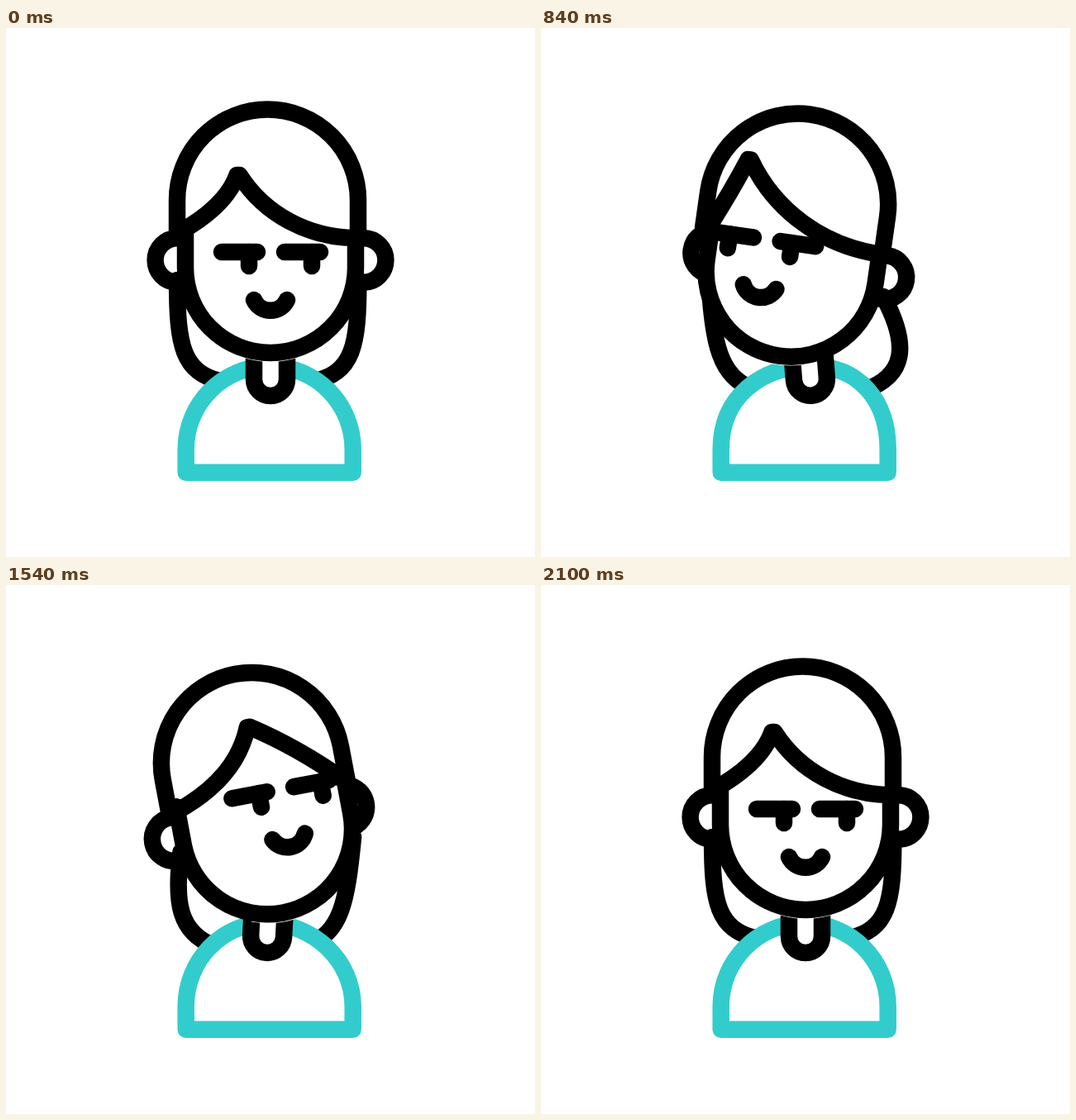
An HTML page that plays this animation: 640 by 640 pixels, repeating every 2400 ms.

```html
<!DOCTYPE html>
<html lang="en">
<head>
<meta charset="utf-8">
<title>Head turn</title>
<style>
  html, body { margin: 0; width: 100%; height: 100%; overflow: hidden; background: #fff; }
  svg { display: block; width: 100%; height: 100%; }
  path { fill: none; stroke: #000; stroke-width: 20.5; stroke-linecap: round; stroke-linejoin: round; }
  .solid { fill: #fff; }
  #shirt { stroke: #3cc; }
  #gap { stroke: #fff; stroke-width: 21.5; stroke-linecap: butt; }
</style>
</head>
<body>
<svg viewBox="0 0 640 640">
  <path id="backHair"/>
  <path id="shirt" class="solid"/>
  <path id="neck" class="solid" d="M300 385V425A20 20 0 0 0 340 425V385"/>
  <g id="head">
    <path id="gap" d="M-36 96.5A103 103 0 0 0 36 96.5"/>
    <path id="leftEar" d="M-112.7 -35.7A26.7 26.7 0 0 0 -112.7 17.7"/>
    <path id="rightEar" d="M112.7 -35.7A26.7 26.7 0 0 1 112.7 17.7"/>
    <path class="solid" d="M-103 -47V0A103 103 0 0 0 103 0V-36"/>
    <path d="M-113 -38V-82A109.5 109.5 0 0 1 106 -82V-38"/>
    <path id="fringe"/>
    <g id="features">
      <path d="M-59 -19H-16M17 -19H60M-20 39A22 22 0 0 0 20 39"/>
      <path id="pupils" d="M-26 -19V-2M50 -19V-2"/>
    </g>
  </g>
</svg>
<script>
const LOOP = 2400, STEP = 20, LEFT = 840, RIGHT = 1470, END = 2100;
const $ = id => document.getElementById(id);
const setPath = (id, d) => $(id).setAttribute('d', d);
const move = (id, x, y = 0) => $(id).setAttribute('transform', `translate(${x} ${y})`);

// Rises from 0 to 1 at the peak and falls back to 0.
const ramp = (t, from, peak, to) =>
  Math.max(0, Math.min((t - from) / (peak - from), (to - t) / (to - peak)));

// One lock of hair behind the head; side is -1 or 1.
function strand(side, root, belly, tip, rise, drop) {
  const edge = 316.7 + side * 109.6;
  return `M${edge + root} ${305 + rise}C${edge + belly} 385 ` +
    `${edge - side * 6 + belly} ${417 + drop / 3} ${edge - side * 55 + tip} ${428 + drop}`;
}

function drawFringe(tilt, left, right) {
  const shift = -3.7 * tilt, sag = 1 + 0.2 * left - 1.35 * right;
  const x = -39 + shift, y = -112 - 15 * (left + right);
  const endY = -36 - 5 * right, dx = 103 - x, dy = endY - y;
  const bend = shift * (shift < 0 ? 1.1 : 0.7);
  setPath('fringe',
    `M-103 ${-47 + 6 * right}Q${-53 + bend} ${-77 + shift / 4} ${x - 1.5} ${y}H${x + 1.5}` +
    `C${x + dx / 3 - 15 * sag} ${y + dy / 3 + 23 * sag} ` +
    `${x + dx * 2 / 3 - 9 * sag} ${y + dy * 2 / 3 + 25 * sag} 103 ${endY}`);
}

function drawBody(tilt, left, right) {
  const drop = 10 * (left + right), lean = 9 * left - 4 * right;
  setPath('backHair',
    strand(-1, 5 * right - 4 * left, 2 * left - 4 * right, -4 * left - 12 * right, 20 * right, drop) +
    strand(1, -12 * left - 7 * right, 20 * left - 16 * right, 21 * left - 9 * right, 20 * left, drop));
  setPath('shirt',
    `M217.7 537.8V510C217.7 ${454 - 9 * left} ${263 + lean / 2} 409 ${318.7 + lean} 409` +
    `C${375 + lean} 409 419.7 ${454 - 4 * left} 419.7 510V537.8Z`);
  const sway = tilt * (tilt > 0 ? -0.56 : -0.28);
  $('neck').setAttribute('transform', `rotate(${sway} 320 350)`);
}

function draw(t) {
  const left = ramp(t, 0, LEFT, RIGHT), right = ramp(t, LEFT, RIGHT, END);
  const tilt = 8.1 * left - 12 * right;
  const x = 320 - 17.4 * left - 4.5 * right, y = 290 + 4.7 * left + 6 * right;
  $('head').setAttribute('transform', `translate(${x} ${y}) rotate(${tilt})`);
  move('features', 27 * right - 35 * left, -15.4 * left - 28.5 * right);
  move('pupils', -19 * left);
  move('leftEar', 16 * left);
  move('rightEar', -18 * right);
  drawFringe(tilt, left, right);
  drawBody(tilt, left, right);
}

const start = performance.now();
function tick() {
  const t = (performance.now() - start) % LOOP;
  draw(Math.floor(t / STEP) * STEP);
  requestAnimationFrame(tick);
}
tick();
</script>
</body>
</html>
```
